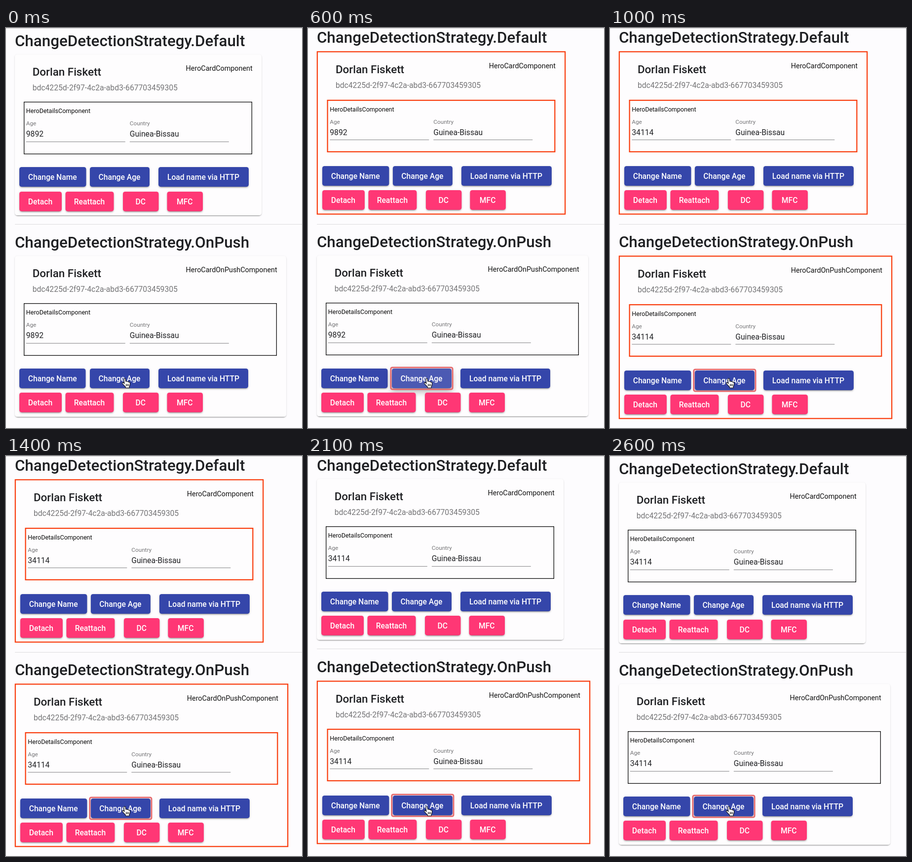
An HTML page with a canvas for the animation above (2.7 s loop, 600 by 814 pixels).

```html
<!DOCTYPE html>
<html lang="en">
<head>
<meta charset="utf-8">
<title>Change detection</title>
<style>
  html, body { margin: 0; width: 100%; height: 100%; overflow: hidden; background: #fdfcfe; }
  canvas { display: block; }
</style>
</head>
<body>
<canvas id="stage" width="600" height="814"></canvas>
<script>
const ctx = document.getElementById('stage').getContext('2d');
const LOOP = 2700;
const RED = '#f93d0e', INK = '#1f2023', GREY = '#747476';
const INDIGO = '#3546aa', RIPPLE = '#4c5ab3', PINK = '#ff3775';

// Shadow layers: [offset y, blur, spread, alpha]
const CARD_SHADOW = [[2.2, 1.1, -1.1, .2], [1.1, 1.1, 0, .14], [1.1, 3.4, 0, .12]];
const BUTTON_SHADOW = [[3.4, 1.1, -2.2, .2], [2.2, 2.2, 0, .14], [1.1, 5.6, 0, .12]];
const PRESSED_SHADOW = [[5.6, 5.6, -3.4, .2], [9, 11.2, 1.1, .14], [3.4, 15.7, 2.2, .12]];

// Buttons: [label, x, width]
const ROWS = [
  [['Change Name', 27, 135.5], ['Change Age', 170, 121], ['Load name via HTTP', 309, 183]],
  [['Detach', 27, 86], ['Reattach', 120.5, 98], ['DC', 237, 72.5], ['MFC', 326.5, 72.5]]
];

// Card tops, headings and rule for each part of the loop
const SCENES = [
  { until: 600, h1: 37, top1: 54, rule: 399, h2: 447, top2: 463.6, age: '9892', trim: 1 },
  { until: 700, h1: 30, top1: 47.3, on1: true, rule: 399, h2: 446, top2: 463.1, age: '9892', trim: 1, ring: true, pressed: true },
  { until: 2100, h1: 30, top1: 47.3, on1: true, rule: 399, h2: 446, top2: 463.3, on2: true, age: '34114', ring: true },
  { until: 2200, h1: 30, top1: 46.5, rule: 392, h2: 440, top2: 457, on2: true, age: '34114', ring: true },
  { until: LOOP, h1: 37, top1: 54, rule: 399, h2: 447, top2: 463.6, age: '34114', ring: true }
];

function text(str, x, y, size, color = INK, weight = 400) {
  ctx.font = `${weight} ${size}px Roboto, sans-serif`;
  ctx.fillStyle = color;
  ctx.fillText(str, x, Math.round(y));
}

function roundRect(x, y, w, h, r) {
  ctx.beginPath();
  ctx.roundRect(x, y, w, h, r);
}

function raised(x, y, w, h, color, shadow) {
  ctx.fillStyle = color;
  for (const [dy, blur, spread, alpha] of shadow) {
    ctx.shadowColor = `rgba(0,0,0,${alpha})`;
    ctx.shadowOffsetY = dy;
    ctx.shadowBlur = blur;
    roundRect(x - spread, y - spread, w + 2 * spread, h + 2 * spread, 4.5);
    // Only the shadow may show outside the face
    ctx.save();
    ctx.translate(-1000, 0);
    ctx.shadowOffsetX = 1000;
    roundRect(x - spread, y - spread, w + 2 * spread, h + 2 * spread, 4.5);
    ctx.fill();
    ctx.restore();
  }
  ctx.shadowColor = 'transparent';
  roundRect(x, y, w, h, 4.5);
  ctx.fill();
}

function frame(x, y, w, h, line, color) {
  ctx.strokeStyle = color;
  ctx.lineWidth = line;
  ctx.strokeRect(x + line / 2, y + line / 2, w - line, h - line);
}

function button(label, x, y, w, color, { trim = 0, ring, pressed }) {
  if (ring) {
    roundRect(x - 3.5, y - 3.5, w + 7, 47, 4);
    ctx.fillStyle = '#f4dbe0';
    ctx.fill();
  }
  raised(x, y, w - trim, 40, pressed ? RIPPLE : color, pressed ? PRESSED_SHADOW : BUTTON_SHADOW);
  if (ring) {
    roundRect(x - 2.2, y - 2.2, w + 4.4, 44.4, 3);
    ctx.strokeStyle = '#e5676a';
    ctx.lineWidth = 2.6;
    ctx.stroke();
  }
  ctx.textAlign = 'center';
  text(label, x + w / 2 - .5, y + 25.5, 15.68, '#fff', 500);
  ctx.textAlign = 'left';
}

function field(label, value, x, top, on) {
  const dy = on ? 3.2 : 0;
  text(label, x, top + 144 + dy, 11.76, GREY);
  text(value, x, top + 167 + dy, 15.68);
  ctx.fillStyle = '#8d8d8f';
  ctx.fillRect(x, Math.round(top + 177 + dy * .7), 201, 1.1);
}

function card(top, width, title, age, on, focus) {
  const edge = on ? 2.24 : 0, y = Math.round(top);
  if (on) {
    ctx.fillStyle = '#fefdfe';
    ctx.fillRect(18, y, width + 4.5, 333);
    frame(17.7, y + .2, width + 4.6, 332.6, 2.24, RED);
  } else {
    raised(18, y, width, 327.3, '#fefdfe', CARD_SHADOW);
  }

  text('Dorlan Fiskett', 53.7 + edge, top + 43 + edge * .9, 22.4, INK, 500);
  text('bdc4225d-2f97-4c2a-abd3-667703459305', 53.7 + edge, top + 73 + edge * .9, 15.68, GREY);
  text(title, 364.6 + edge, top + 33 + edge * .9, 14.34, '#111');

  const boxY = Math.round(top + 96 + edge);
  frame(36 + edge * 1.1, boxY, width - 37, 107, on ? 2.24 : 1.3, on ? RED : '#0a0a0a');
  const inner = 40.8 + (on ? 3.5 : 0);
  text('HeroDetailsComponent', inner, top + 119 + (on ? 3.2 : 0), 12.54, '#0a0a0a');
  field('Age', age, inner, top, on);
  field('Country', 'Guinea-Bissau', inner + 210, top, on);

  ROWS.forEach((row, r) => row.forEach(([label, x, w], i) => {
    const target = r === 0 && i === 1;
    const style = target ? { ring: focus.ring, pressed: focus.pressed }
                         : { trim: r === 0 ? focus.trim : 0 };
    const rowY = Math.round(top + 229.4 + r * 49.3 + (on ? 4.3 : 0));
    button(label, x + (on ? 1.9 : 0), rowY, w, r ? PINK : INDIGO, style);
  }));
}

function hand(x, y) {
  ctx.save();
  ctx.translate(x, y);
  const outline = new Path2D('M4.6 10 L4 3 Q4 1 5.5 1 Q7 1 7.2 3 L7.8 7.2 Q9.8 6 10.6 7.8 ' +
    'Q12.8 6.8 13.5 8.8 Q16.6 8 16.6 11 Q16.6 15 15 17.5 L15 20.3 H7.5 L7 18 ' +
    'Q3 14 1 11.5 Q.2 9.6 2 9.2 Q3.5 9.4 5 11.6 Z');
  ctx.fillStyle = '#fff';
  ctx.fill(outline);
  ctx.strokeStyle = '#080808';
  ctx.lineWidth = 1.1;
  ctx.lineJoin = 'round';
  ctx.stroke(outline);
  ctx.beginPath();
  for (const lineX of [8.6, 10.9, 13.2]) {
    ctx.moveTo(lineX, 12.5);
    ctx.lineTo(lineX, 16.8);
  }
  ctx.stroke();
  ctx.restore();
}

function draw(time) {
  const s = SCENES.find(scene => time < scene.until);
  ctx.fillStyle = '#fdfcfe';
  ctx.fillRect(0, 0, 600, 814);
  ctx.fillStyle = '#cdccce';
  ctx.fillRect(0, 0, 600, 1);
  ctx.fillStyle = '#dcdbdd';
  ctx.fillRect(18, s.rule, 582, 1);

  text('ChangeDetectionStrategy.Default', 17.9, s.h1, 31.36, INK, 500);
  card(s.top1, 500, 'HeroCardComponent', s.age, s.on1, {});
  text('ChangeDetectionStrategy.OnPush', 17.9, s.h2, 31.36, INK, 500);
  card(s.top2, 550, 'HeroCardOnPushComponent', s.age, s.on2, s);
  hand(235, 712);
}

function tick() {
  draw(performance.now() % LOOP);
  requestAnimationFrame(tick);
}
tick();
</script>
</body>
</html>
```
